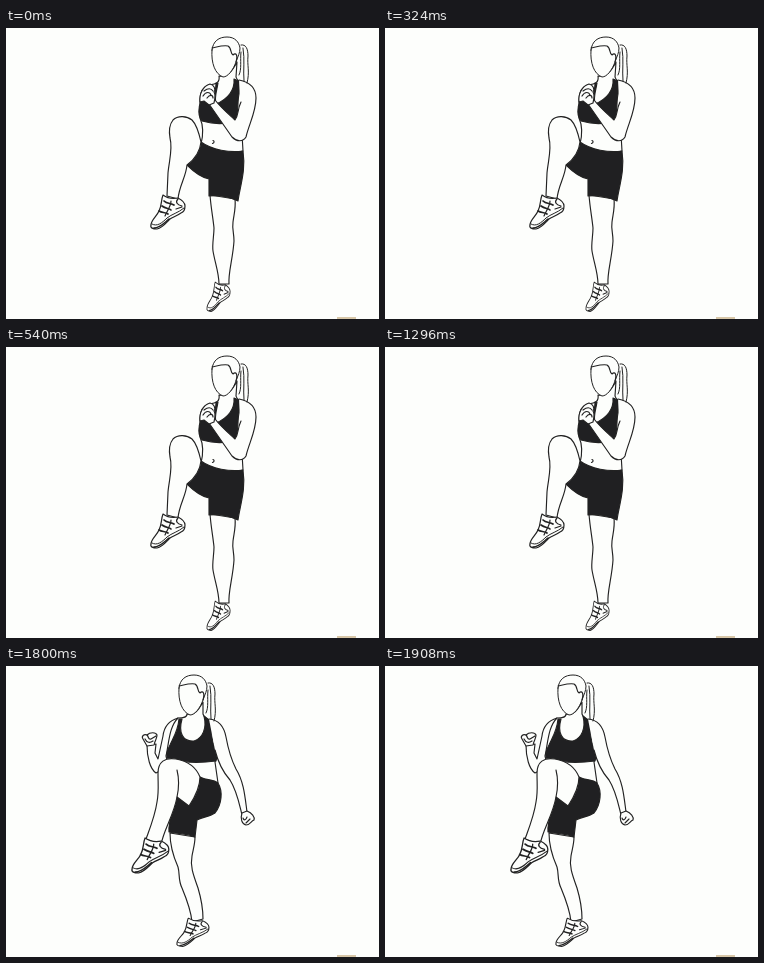
An HTML page with a canvas for the animation above (1.98 s loop, 373 by 291 pixels).

```html
<!DOCTYPE html>
<html lang="en">
<head>
<meta charset="utf-8">
<title>High knees</title>
<style>
html, body { margin: 0; width: 100%; height: 100%; overflow: hidden; background: #fdfefc; }
canvas { display: block; }
</style>
</head>
<body>
<canvas id="stage" width="373" height="291"></canvas>
<script>
const ctx = document.getElementById('stage').getContext('2d');
const LOOP = 1980, SWITCH = 1800;
const PAPER = '#fdfefc', INK = '#222', CLOTH = '#202022';

function line(d, width = 1.15) {
  ctx.lineWidth = width;
  ctx.strokeStyle = INK;
  ctx.stroke(new Path2D(d));
}

function shape(d, fill = PAPER, width = 1.15) {
  ctx.fillStyle = fill;
  ctx.fill(new Path2D(d));
  line(d, width);
}

// Head, hair and ponytail, shared by both poses
function head(dx) {
  ctx.save();
  ctx.translate(dx, 0);
  line('M235 17C240 16 242 21 242 28C241 37 244 44 241 55M235 24C234 33 236 41 233 47M237 20C239 32 237 42 238 53', 1);
  shape('M206 22C207 13 213 9 221 9C229 9 233 14 234 20C234 25 232 28 230 34C227 42 222 49 217 49C209 46 205 35 206 22Z', PAPER, 1);
  line('M206 20C211 19 217 17 222 18C226 20 224 26 227 27C230 24 232 27 230 34');
  ctx.restore();
}

// Sneaker drawn pointing down-left, placed by its ankle
function shoe(x, y, sx, sy) {
  ctx.save();
  ctx.translate(x, y);
  ctx.scale(sx, sy);
  shape('M-8 -1C-4 2 2 3 7 2C11 4 14 7 14 10C14 13 13 16 10 17C6 20 2 21 -1 23C-5 27 -9 32 -14 33C-18 33 -21 32 -20 29C-20 24 -14 20 -12 15C-9 9 -10 4 -8 -1Z', PAPER, 1.2);
  line('M-19 28C-14 31 -9 27 -4 22C1 18 7 17 13 12', 1);
  line('M-17 32C-11 32 -7 27 -2 23', 1.5);
  line('M-7 5C-4 8 0 7 3 9M-9 10C-5 13 -2 12 0 14M-12 15C-9 17 -6 16 -3 18', 1.7);
  line('M0 5C0 10 -3 13 -6 20M7 3C4 6 6 9 11 10M5 13L11 11', 1.2);
  ctx.restore();
}

function poseHigh() {
  // standing leg
  shape('M204 167C205 180 207 190 208 200C208 208 206 216 207 223C209 235 213 245 213 256L223 256C222 245 227 230 228 213C228 205 226 201 227 194C228 186 230 180 229 171Z');
  shoe(214.6, 255, 0.68, 0.86);
  // torso
  shape('M213 48C214 54 211 56 203 57C196 59 194 64 194 72L194 90C198 99 197 108 195 116C204 123 226 127 237 123L236 106L246 66C243 57 231 55 230 49L231 34C226 44 221 49 213 48Z');
  line('M207 112.500C208.500 113 208.500 115 206.500 115.500', 1.2);
  // top
  shape('M210 55C210 62 208 69 207 74L195 73C192 80 192 88 196 93C207 96 220 97 229 92C233 87 231 76 233 66L233 53L228 51C229 62 222 71 210 76C208 69 211 62 212 55Z', CLOTH);
  // near arm
  shape('M233 52C243 54 250 60 250 70C250 84 243 96 240 109C237 114 231 114 226 109L203 76L209 72C217 82 224 87 229 92C233 87 231 82 235 74');
  // far shoulder and hand
  shape('M194 74C193 66 197 58 204 56C208 57 210 61 208 64C210 67 209 71 208 75L203 77L198 73Z');
  line('M198 63C202 60 205 60 207 63M197 68C200 63 204 64 205 67M201 70C204 66 207 67 207 70', 1.2);
  // shorts
  shape('M195 114C206 122 224 125 237 123C240 143 234 158 232 173C222 168 211 167 203 168L203 151C194 149 187 143 181 137C189 131 194 124 195 114Z', CLOTH);
  // raised leg
  shape('M195 114C193 105 191 97 186 92C181 88 172 87 167 92C163 97 163 104 164 110C167 121 163 133 162 145L161 168L172 171C173 158 180 149 181 137C189 131 194 124 195 114Z');
  shoe(165, 168, 1, 1);
  head(0);
}

function poseTurn() {
  // far arm
  shape('M172 52C162 55 158 61 157 70L152 93L149 87L150 78L141 79C141 91 144 103 150 107C156 105 159 98 162 92L171 68Z');
  shape('M137 73C135 70 138 68 141 69C144 66 150 66 151 69C151 73 149 74 148 79L141 80Z');
  line('M141 69C143 71 142 74 145 73L150 70M139 73C141 77 144 77 147 75', 1.2);
  // standing leg
  shape('M164 167C164 180 168 192 172 201C174 208 172 214 176 222C181 234 185 244 186 256L197 253C197 242 195 232 192 222C187 208 184 200 186 190C187 184 189 178 189 171Z');
  shoe(189.8, 253, 0.94, 0.83);
  // torso
  shape('M181 48C181 52 176 52 172 52C163 61 163 77 160 90L162 98L194 112L212 117L209 96L218 65C211 55 199 56 197 48L197 36C192 45 188 50 181 48Z');
  // top
  shape('M173 53C172 65 167 72 164 79C160 86 160 92 163 93C178 97 196 97 210 95C213 88 208 81 207 76C205 68 206 61 203 54L198 50C201 62 197 72 188 75C177 76 172 67 176 53Z', CLOTH);
  // near arm
  shape('M203 53C213 54 218 60 220 71C222 82 225 93 230 103C238 116 239 131 241 146L236 149C233 137 231 125 224 114C216 105 212 96 209 84');
  shape('M236 147L241 145C246 147 249 151 248 154C245 155 244 159 240 159C236 158 234 153 236 147Z');
  line('M241 151C240 154 238 155 237 152M244 153L240 157');
  // shorts
  shape('M194 111C202 115 207 113 212 117C217 125 216 138 209 147C203 151 196 151 191 154L189 171C181 167 172 168 163 166C162 156 167 145 171 131L183 140C189 131 194 122 194 111Z', CLOTH);
  // raised leg
  shape('M194 111C190 101 181 95 170 93C159 91 152 96 152 107C152 119 153 126 151 136C149 150 144 162 140 173L155 179C157 165 168 149 171 131L183 140C189 131 194 122 194 111Z');
  line('M171 104C173 112 173 122 171 131');
  shoe(147.7, 173, 1.08, 1.03);
  head(-33);
}

function draw(now) {
  ctx.fillStyle = PAPER;
  ctx.fillRect(0, 0, 373, 291);
  ctx.lineCap = ctx.lineJoin = 'round';
  (now % LOOP < SWITCH ? poseHigh : poseTurn)();
  ctx.fillStyle = '#d8c7a8';
  ctx.fillRect(331, 289, 19, 2);
  requestAnimationFrame(draw);
}
requestAnimationFrame(draw);
</script>
</body>
</html>
```
